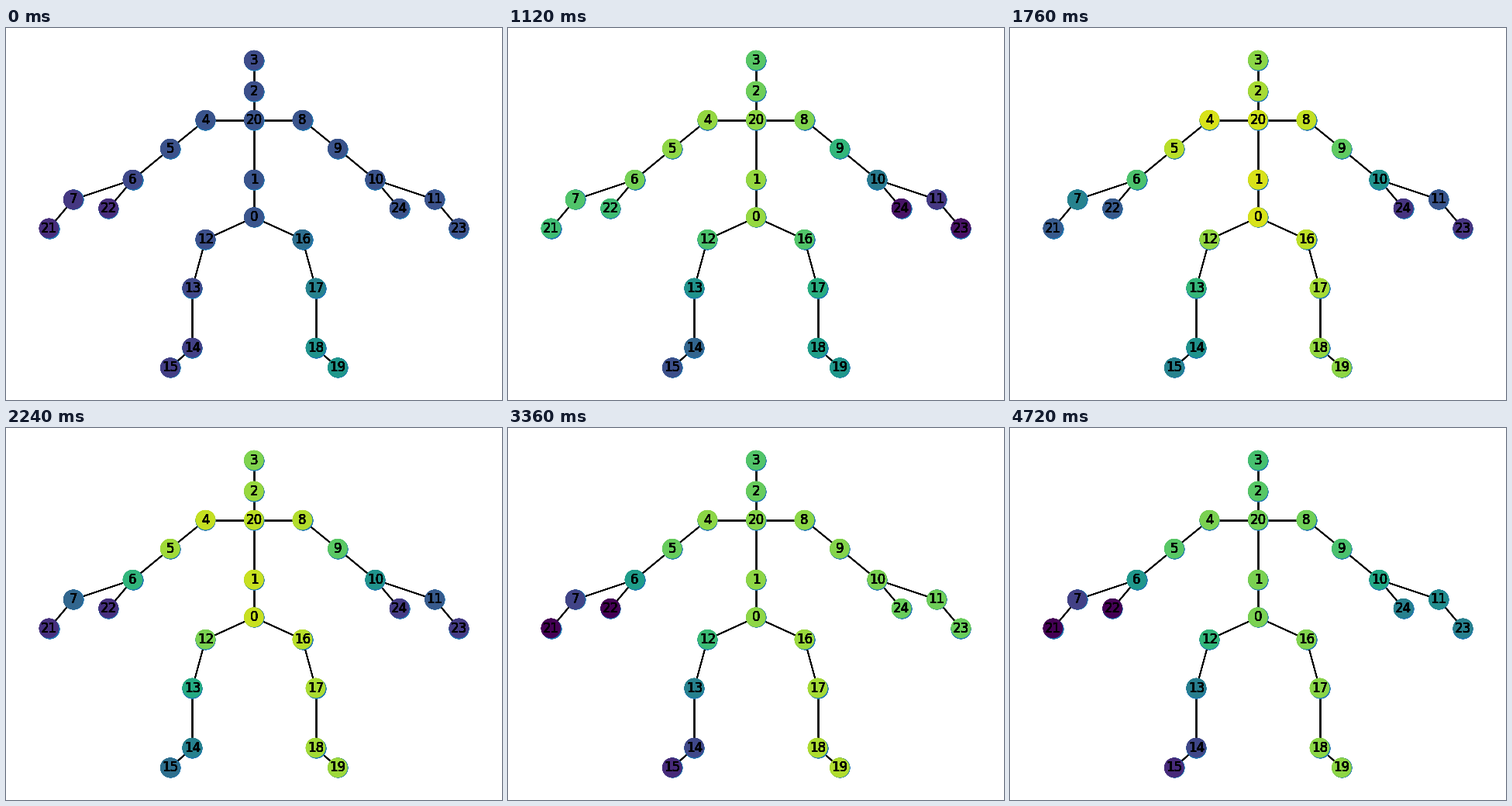
Write a matplotlib script that moves like this. It is 640 px wide and 480 px high and loops after 4.8 s.

```python
import numpy as np
import matplotlib.pyplot as plt
from matplotlib.animation import FuncAnimation
from matplotlib.collections import LineCollection

FRAMES, INTERVAL = 60, 80
LAYERS = 10  # stacked copies harden the antialiased rims and strokes

# Skeleton, y pointing down; limbs are given for the right and mirrored.
SPINE = {1: 5.4, 20: 2.7, 2: 1.4, 3: 0, 0: 7.1}
ARM = [(2.2, 2.7), (3.8, 4.0), (5.5, 5.4), (8.2, 6.3), (9.3, 7.6)]
LEG = [(2.2, 8.1), (2.8, 10.3), (2.8, 13.0), (3.8, 13.9)]
THUMB = (6.6, 6.7)

HEAD = [20, 2, 3]
L_ARM, R_ARM = [4, 5, 6, 7, 21], [8, 9, 10, 11, 23]
L_LEG, R_LEG = [12, 13, 14, 15], [16, 17, 18, 19]
L_THUMB, R_THUMB = 22, 24

# Signal of the trunk and of each limb's tip at a few key frames.
KEYS = [0, 9, 14, 22, 34, 42, 59]
CORE = [.26, .47, .84, .94, .89, .83, .80]
L_HAND = [.13, .19, .69, .28, 0, 0, 0]
R_HAND = [.25, .06, .05, .15, .20, .77, .43]
L_FOOT = [.18, .31, .24, .44, .28, .12, .12]
R_FOOT = [.53, .73, .53, .83, .88, .88, .83]

# Chain, tip signal, and how long the trunk's signal holds along the chain.
SPREAD = [
    (HEAD, np.multiply(CORE, .88), 1.6),
    (L_ARM, L_HAND, 2.5),
    (R_ARM, R_HAND, 1.4),
    (L_LEG, L_FOOT, .85),
    (R_LEG, R_FOOT, .55),
]


def joint_positions():
    pos = np.zeros((25, 2))
    for joint, y in SPINE.items():
        pos[joint] = 0, y
    for left, right, points in ((L_ARM, R_ARM, ARM), (L_LEG, R_LEG, LEG),
                                ([L_THUMB], [R_THUMB], [THUMB])):
        pos[right] = points
        pos[left] = np.multiply(points, (-1, 1))
    return pos


def activation(frame):
    core = np.interp(frame, KEYS, CORE)
    level = np.full(25, core)
    for chain, tip, hold in SPREAD:
        depth = np.arange(1, len(chain) + 1) / len(chain)
        weight = (depth * depth * (3 - 2 * depth)) ** hold
        level[chain] = core + weight * (np.interp(frame, KEYS, tip) - core)
    level[L_THUMB], level[R_THUMB] = level[L_ARM[-1]], level[R_ARM[-1]]
    return level


fig = plt.figure(figsize=(6.4, 4.8), dpi=100, facecolor="white")
ax = fig.add_axes([0, 0, 1, 1])
ax.axis("off")

pos = joint_positions()
half_w, half_h = ARM[-1][0], LEG[-1][1] / 2
margin = 1.1 ** 2
ax.set_xlim(-half_w * margin, half_w * margin)
ax.set_ylim(half_h * (1 + margin), half_h * (1 - margin))

chains = [[0, 1] + HEAD, [20] + L_ARM, [20] + R_ARM, [0] + L_LEG, [0] + R_LEG,
          [L_ARM[2], L_THUMB], [R_ARM[2], R_THUMB]]
bones = [pos[[a, b]] for chain in chains for a, b in zip(chain, chain[1:])]
ax.add_collection(LineCollection(bones * LAYERS, colors="black", linewidths=1,
                                 zorder=1), autolim=False)

# Plain blue discs stay visible as a thin rim around the coloured ones.
disc = dict(s=300, linewidths=1, zorder=2)
nodes = []
for _ in range(LAYERS):
    ax.scatter(*pos.T, color="#1f78b4", **disc)
    nodes.append(ax.scatter(*pos.T, c=activation(0), cmap="viridis",
                            vmin=0, vmax=1, **disc))
    for joint, (x, y) in enumerate(pos):
        ax.text(x, y, str(joint), fontsize=12, family="DejaVu Sans",
                ha="center", va="center", zorder=3)


def update(frame):
    level = activation(frame)
    for layer in nodes:
        layer.set_array(level)
    return nodes


anim = FuncAnimation(fig, update, frames=FRAMES, interval=INTERVAL,
                     repeat=True, repeat_delay=0, blit=False)
plt.show()
```
